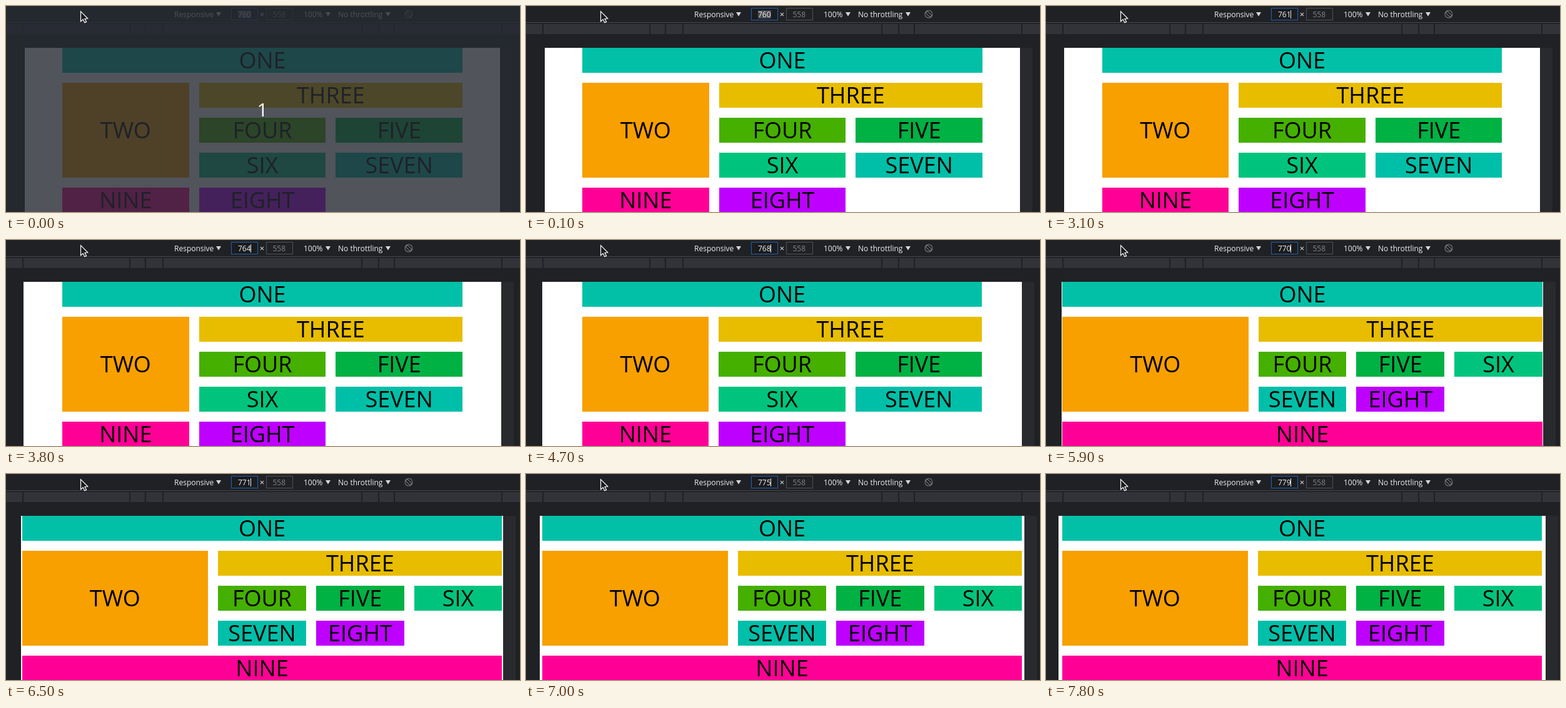
Animation of 822x330 px, one loop 8000 ms. Source, as an HTML page with a canvas:

```html
<!DOCTYPE html>
<html lang="en">
<head>
<meta charset="utf-8">
<title>Responsive grid</title>
<style>
  html, body { margin: 0; width: 100%; height: 100%; overflow: hidden; background: #202124; }
  canvas { display: block; }
</style>
</head>
<body>
<canvas id="stage" width="822" height="330"></canvas>
<script>
const ctx = document.getElementById('stage').getContext('2d');
const LOOP = 8000, TICK = 100, INTRO = 100;
const CENTER = 410, TOP = 67, GAP = 16, ROW = 40, BREAKPOINT = 768;
const RELAYOUT = 4900;   // moment the page gets past the breakpoint
const PAIRS = 6900;      // from here the width grows by two quick presses at a time
const FONT = '"Open Sans", "Noto Sans", sans-serif';

// time and width, straight lines between
const KEYS = [
  [3000, 760], [3080, 761], [4350, 765.95], [4450, 767],
  [4750, 768], [5250, 769], [6500, 771], [PAIRS, 773]
];

const COLORS = {
  ONE: '#02c0a8', TWO: '#f7a000', THREE: '#e8bd00', FOUR: '#45b000', FIVE: '#00b144',
  SIX: '#00c47e', SEVEN: '#00bfa8', EIGHT: '#be00ff', NINE: '#ff0096'
};

function typedWidth(t) {
  if (t >= PAIRS) {
    const since = t - PAIRS;
    return 774 + 2 * Math.floor(since / 400) + (since % 400 >= TICK ? 1 : 0);
  }
  const mid = (Math.floor(t / TICK) + 0.5) * TICK;
  const i = KEYS.findIndex(([time]) => time > mid);
  if (i === 0) return KEYS[0][1];
  const [t0, w0] = KEYS[i - 1], [t1, w1] = KEYS[i];
  return Math.floor(w0 + (w1 - w0) * (mid - t0) / (t1 - t0));
}

// Fills the grid in reading order, each item taking the first free spot.
function makeGrid(width, cols, order, spans) {
  const used = new Set();
  const cells = order.map(name => {
    const [w, h] = spans[name] || [1, 1];
    for (let n = 0; ; n++) {
      const col = n % cols, row = Math.floor(n / cols);
      const spots = Array.from({ length: w * h },
        (_, k) => (row + Math.floor(k / w)) * cols + col + k % w);
      if (col + w <= cols && !spots.some(s => used.has(s))) {
        spots.forEach(s => used.add(s));
        return { name, col, row, w, h };
      }
    }
  });
  return { width, cols, cells };
}

const names = Object.keys(COLORS);
const NARROW = makeGrid(640, 3, [...names.slice(0, 7), 'NINE', 'EIGHT'],
  { ONE: [3, 1], TWO: [1, 3], THREE: [2, 1] });
const WIDE = makeGrid(768, 5, names,
  { ONE: [5, 1], TWO: [2, 3], THREE: [3, 1], NINE: [5, 1] });

function rect(x, y, w, h, color) {
  ctx.fillStyle = color;
  ctx.fillRect(x, y, w, h);
}

function field(x, border, fill) {
  rect(x, 3, 43, 20, border);
  rect(x + 1, 4, 41, 18, fill);
}

function text(str, x, y, size, color, align = 'left', weight = 400) {
  ctx.font = `${weight} ${size}px ${FONT}`;
  ctx.textAlign = align;
  ctx.fillStyle = color;
  ctx.fillText(str, x, y);
}

function label(str, x, color = '#eceef0') {
  text(str, x, 18, 12, color, 'left', 500);
}

function poly(points, color) {
  ctx.beginPath();
  points.forEach(([x, y]) => ctx.lineTo(x, y));
  ctx.closePath();
  ctx.fillStyle = color;
  ctx.fill();
}

function dropdown(str, x, arrow) {
  label(str, x);
  poly([[arrow, 10], [arrow + 8, 10], [arrow + 4, 16.5]], '#d5d7da');
}

function rotateIcon() {
  ctx.save();
  ctx.translate(644, 13);
  ctx.strokeStyle = '#73767a';
  ctx.lineWidth = 1.1;
  ctx.beginPath();
  ctx.arc(0, 0, 6, 0, Math.PI * 2);
  ctx.stroke();
  ctx.rotate(-Math.PI / 4);
  ctx.strokeRect(-2, -5, 4, 10);
  ctx.restore();
}

function toolbar(typed) {
  rect(0, 26, 822, 1, '#46484c');
  dropdown('Responsive', 269, 336);

  const editing = typed > 760;
  field(360, '#1f62b4', '#1b1c1f');
  if (!editing) rect(371, 7, 21, 13, '#4b4d51');
  label(typed, 371);
  if (editing) rect(391, 7, 1, 13, '#f0f0f0');

  text('×', 409.5, 18, 13, '#eceef0', 'center', 500);
  field(416, '#505256', '#202124');
  text('558', 426.5, 18, 12, '#85878b');
  dropdown('100%', 476, 511);
  dropdown('No throttling', 531, 607);
  rotateIcon();
}

function ruler() {
  rect(0, 29, 822, 16, '#323338');
  for (const w of [320, 375, 425, 768]) {
    const left = Math.floor(CENTER - w / 2);
    rect(left, 29, 2, 16, '#1f2023');
    rect(left + w - 2, 29, 2, 16, '#1f2023');
  }
}

function page(width) {
  const half = width % 2 / 2;
  const left = Math.floor(CENTER - width / 2);
  rect(left + width, TOP, 20, 330 - TOP, '#292a2d');
  rect(left, TOP, width, 330 - TOP, '#fff');

  const { width: inner, cols, cells } = width < BREAKPOINT ? NARROW : WIDE;
  const start = CENTER - inner / 2 - half;
  const pitch = (inner + GAP) / cols;

  for (const { name, col, row, w, h } of cells) {
    const x = start + col * pitch, x2 = x + w * pitch - GAP;
    const y = TOP + row * (ROW + GAP), height = h * (ROW + GAP) - GAP;
    const x0 = Math.round(x);
    rect(x0, y, Math.round(x2 - 0.02) - x0, height, COLORS[name]);
    text(name, (x + x2) / 2, y + height / 2 + 13, 36, '#000', 'center');
  }
}

function pointer() {
  poly([[119.5, 8.7], [119.5, 24.7], [123.2, 21.5], [125.8, 26.7],
        [128.6, 25.4], [126, 20.4], [130.8, 20]], '#1c1c1e');
  ctx.strokeStyle = '#fff';
  ctx.lineWidth = 1.2;
  ctx.stroke();
}

function draw(t) {
  const typed = typedWidth(t);
  rect(0, 0, 822, 330, '#202124');
  toolbar(typed);
  ruler();
  page(t < RELAYOUT ? Math.min(typed, BREAKPOINT - 1) : typed);
  if (t < INTRO) {
    rect(0, 0, 822, 330, 'rgba(38,42,50,0.8)');
    text('1', CENTER, 177, 30, '#fff', 'center');
  }
  pointer();
}

let begin;
function tick(now) {
  begin ??= now;
  draw((now - begin) % LOOP);
  requestAnimationFrame(tick);
}
draw(0);
requestAnimationFrame(tick);
</script>
</body>
</html>
```
